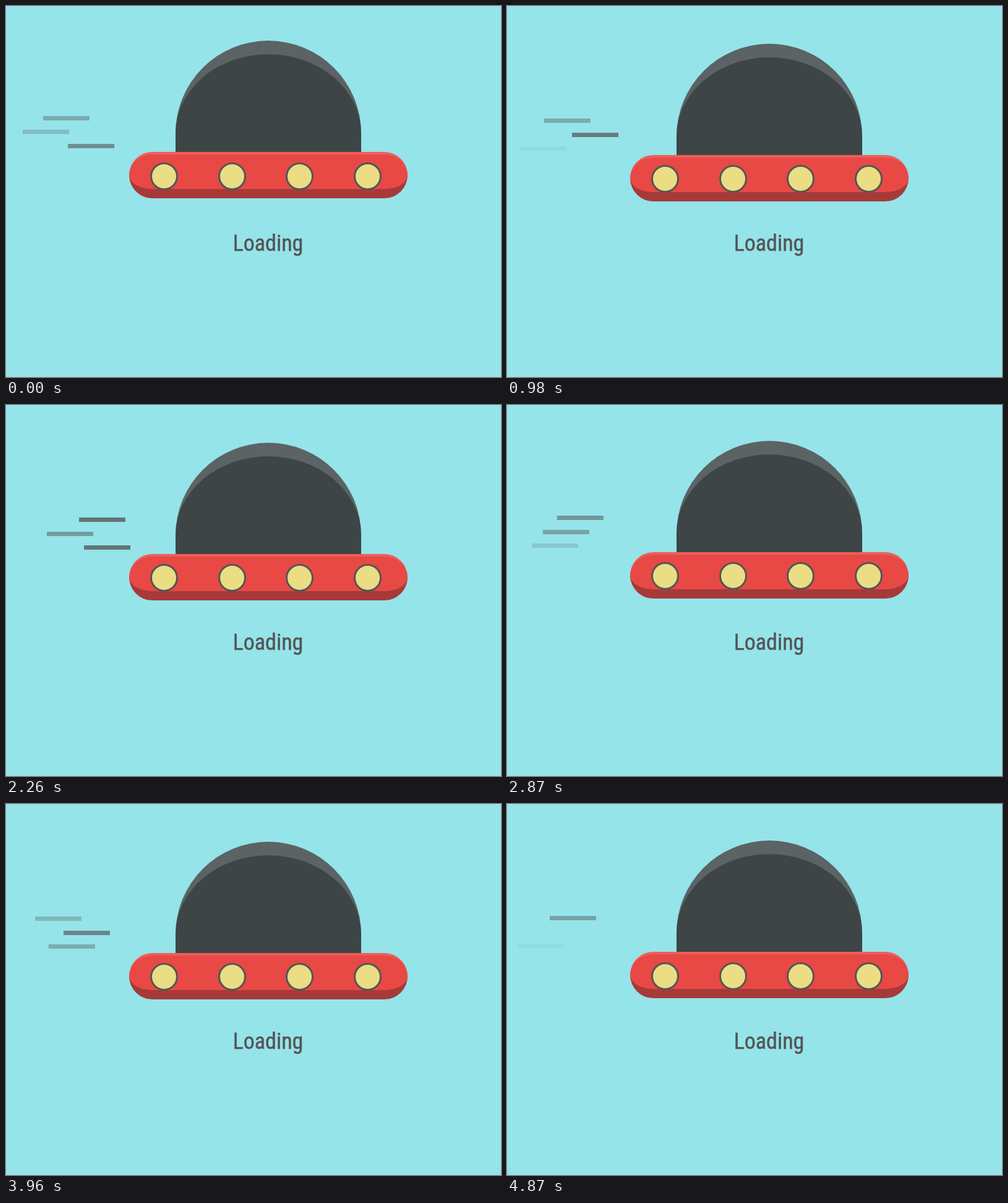
Animation of 800 by 600 pixels, one loop 4970 ms. Source, as an HTML page:

```html
<!DOCTYPE html>
<html lang="en">
<head>
<meta charset="utf-8">
<title>Loading</title>
<style>
  html, body { margin: 0; width: 100%; height: 100%; overflow: hidden; background: #95e4ea; }
  svg { display: block; width: 800px; height: 600px; }
  text {
    font: 400 36px "Roboto Condensed", Roboto, sans-serif; font-stretch: 75%;
    fill: #555; stroke: #555; stroke-width: .5px;
  }
</style>
</head>
<body>
<svg viewBox="0 0 800 600">
  <rect width="800" height="600" fill="#95e4ea"/>
  <g id="wind" fill="#555"></g>
  <g id="hull">
    <path fill="#5b6364" d="M274 180V150a150 150 0 0 1 300 0V180z"/>
    <path fill="#3d4546" d="M274 180V150a150 128 0 0 1 300 0V180z"/>
    <path fill="#ec5f5c" d="M199 217.5a37.5 37.5 0 0 1 37.5-37.5h375a37.5 37.5 0 0 1 37.5 37.5z"/>
    <path fill="#a63a39" d="M199 217.5a37.5 37.5 0 0 0 37.5 37.5h375a37.5 37.5 0 0 0 37.5-37.5z"/>
    <path fill="#e84945" d="M199 217.5a37.5 33.5 0 0 1 37.5-33.5h375a37.5 33.5 0 0 1 37.5 33.5a37.5 22.5 0 0 1-37.5 22.5h-375a37.5 22.5 0 0 1-37.5-22.5z"/>
  </g>
  <g id="lamps" fill="#eadd84" stroke="#555" stroke-width="3"></g>
  <text x="423.5" y="396" text-anchor="middle">Loading</text>
</svg>
<script>
const LOOP = 4970, REST = 100; // the last pose rests before the restart
const $ = id => document.getElementById(id);

function add(parent, tag, attrs) {
  const el = document.createElementNS("http://www.w3.org/2000/svg", tag);
  for (const k in attrs) el.setAttribute(k, attrs[k]);
  return parent.appendChild(el);
}

// Each streak runs left from x over span, again every period,
// and has faded out at the fraction fade of its run.
const streaks = [
  { x: 150, span: 150, fade: 1, period: 490, phase: .6 },
  { x: 150, span: 230, fade: .74, period: 590, phase: .535 },
  { x: 160, span: 150, fade: 1, period: 388, phase: .4 }
];
for (const s of streaks) s.el = add($("wind"), "rect", { width: 75, height: 7 });

for (let i = 0; i < 4; i++)
  add($("lamps"), "circle", { cx: Math.round(233 + 109.5 * i) + 22.5, cy: 22.5, r: 21 });

// Top of the dome: short dips between longer, flatter rises
function bob(t) {
  const a = 2 * Math.PI * (t - 153) / 1470;
  return 58.8 - 3 * Math.cos(a) - 1.5 * Math.cos(2 * a);
}

function shift(id, y) {
  $(id).setAttribute("transform", `translate(0 ${Math.round(y)})`);
}

function draw(t) {
  const y = bob(t);
  shift("hull", y);
  shift("lamps", y + 196.8);
  streaks.forEach((s, i) => {
    const p = (t / s.period + s.phase) % 1;
    s.el.setAttribute("x", Math.round(s.x - s.span * p));
    s.el.setAttribute("y", Math.round(y + 121.5 + 22.5 * i));
    s.el.setAttribute("opacity", Math.max(0, 1 - p / s.fade));
  });
}

const start = performance.now();
function frame() {
  draw(Math.min((performance.now() - start) % LOOP, LOOP - REST));
  requestAnimationFrame(frame);
}
frame();
</script>
</body>
</html>
```
